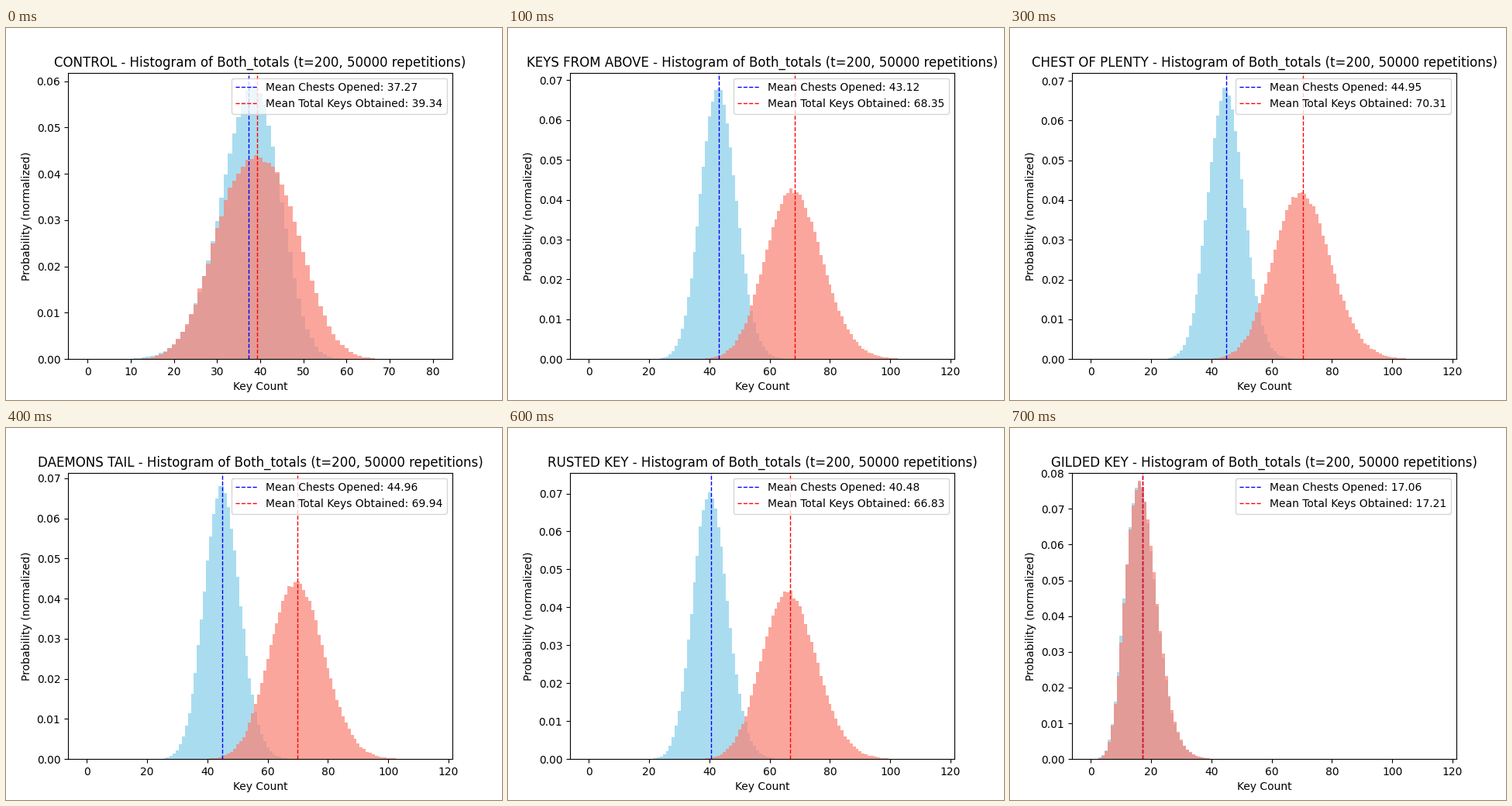
These frames come from a looping animation (640 px wide and 480 px high, 0.8 s). A matplotlib script:

```python
import numpy as np
import matplotlib.pyplot as plt
from matplotlib.animation import FuncAnimation

REPETITIONS = 50000


def skewed_bell(bins, center, sigma, skew, flatness):
    """Gamma-shaped bell; a flatness above 1 widens the top and cuts the tails."""
    z = (bins - center) / sigma
    z = np.sign(z) * np.abs(z) ** flatness
    base = np.maximum(1 + skew * z / 2, 1e-9)
    log_height = (4 / skew ** 2 - 1) * np.log(base) - 2 * z / skew
    return np.exp(log_height - log_height.max())


def distribution(bins, mean, sigma, skew, flatness=1, comb=False):
    """Probabilities per bin, centred so that their average is the mean."""
    # Odd counts become rarer as the count grows.
    keep = np.where(bins % 2, np.interp(bins, [34, 61], [1, 0.4]), 1) if comb else 1
    center = mean
    for _ in range(4):
        curve = skewed_bell(bins, center, sigma, skew, flatness) * keep
        curve /= curve.sum()
        center += mean - bins @ curve
    return curve


def sampled(curve, rng):
    """Add mild sampling noise."""
    noise = 0.4 * rng.standard_normal(curve.size) * np.sqrt(curve / REPETITIONS)
    return np.maximum(curve + noise, 0)


def scene(name, peak, chests, keys, last=115, comb=False):
    bins = np.arange(last + 1)
    rng = np.random.default_rng(last)
    return dict(name=name, peak=peak, bins=bins, means=(chests[0], keys[0]),
                chests=sampled(distribution(bins, *chests, comb=comb), rng),
                keys=sampled(distribution(bins, *keys), rng))


# Chests and keys: mean, spread, skew and, where needed, flatness.
scenes = [
    scene("CONTROL", 0.0589, (37.27, 6.83, -0.31), (39.34, 9.73, 0.02, 1.2), last=80),
    scene("KEYS FROM ABOVE", 0.0685, (43.12, 5.85, 0.1), (68.35, 9.4, 0.15)),
    scene("MOMS KEY", 0.0691, (44.94, 5.85, 0.08), (70.74, 9.9, 0.16)),
    scene("CHEST OF PLENTY", 0.0686, (44.95, 5.87, 0.1), (70.31, 9.5, 0.14)),
    scene("DAEMONS TAIL", 0.0680, (44.96, 5.88, 0.1), (69.94, 9.0, 0.12)),
    scene("CONTRACT FROM BELOW", 0.03877, (39.3, 12.05, 0.03, 1.17),
          (40.22, 11.89, 0.23, 1.07), comb=True),
    scene("RUSTED KEY", 0.0719, (40.48, 5.72, 0.15), (66.83, 9.05, 0.17)),
    scene("GILDED KEY", 0.0763, (17.06, 5.25, 0.43), (17.21, 5.27, 0.44)),
]

fig, ax = plt.subplots(figsize=(6.4, 4.8), dpi=100)


def draw(frame):
    now = scenes[frame]
    bins = now["bins"]
    ax.clear()
    for part, color in (("chests", "skyblue"), ("keys", "salmon")):
        ax.bar(bins, now[part], width=1, color=color, alpha=0.7)

    labels = ("Mean Chests Opened", "Mean Total Keys Obtained")
    for mean, label, color in zip(now["means"], labels, ("blue", "red")):
        ax.axvline(mean, color=color, linestyle="dashed", linewidth=1,
                   label=f"{label}: {mean}")

    margin = 0.05 * len(bins)
    ax.set_xlim(-0.5 - margin, bins[-1] + 0.5 + margin)
    ax.set_ylim(0, 1.05 * now["peak"])
    ax.set_title(f"{now['name']} - Histogram of Both_totals "
                 f"(t=200, {REPETITIONS} repetitions)")
    ax.set_xlabel("Key Count")
    ax.set_ylabel("Probability (normalized)")
    ax.legend(loc="upper right")


animation = FuncAnimation(fig, draw, frames=len(scenes), interval=100, repeat=True)
plt.show()
```
